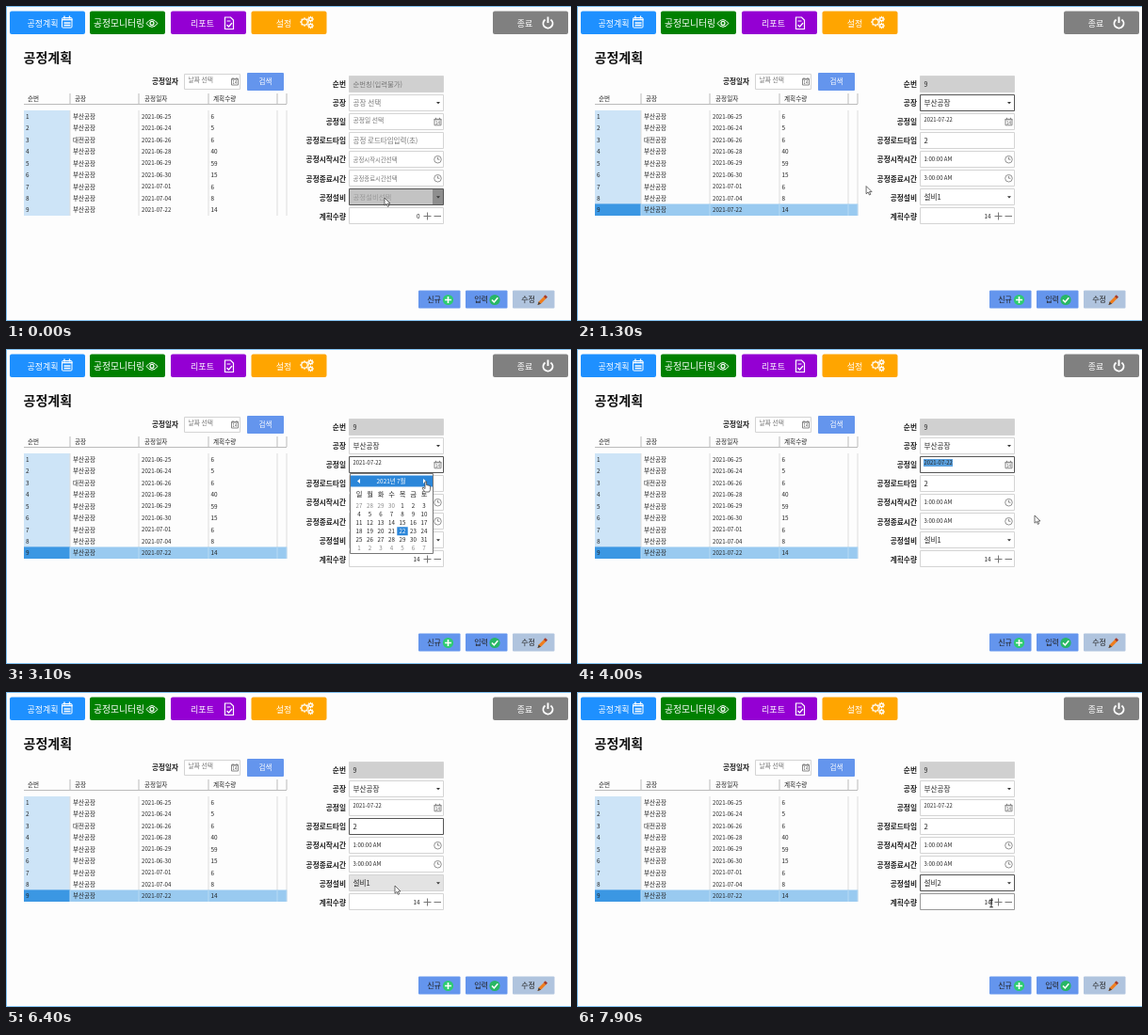
Animation of 600x335 px, one loop 8000 ms. Source, as an HTML page with a canvas:

```html
<!DOCTYPE html>
<html lang="ko">
<head>
<meta charset="utf-8">
<style>
html, body { margin: 0; width: 100%; height: 100%; overflow: hidden; background: #fdfdfd; }
canvas { display: block; }
</style>
</head>
<body>
<canvas id="stage" width="600" height="335"></canvas>
<script>
const c = document.getElementById('stage').getContext('2d');
const LOOP = 8000, FONT = '"Noto Sans CJK KR", "Noto Sans KR", sans-serif';
const INK = '#222', HINT = '#777', BLUE = '#2b86d9';

function rect(x, y, w, h, fill, stroke, r = 0) {
  c.beginPath();
  c.roundRect(x, y, w, h, r);
  if (fill) { c.fillStyle = fill; c.fill(); }
  if (stroke) { c.strokeStyle = stroke; c.lineWidth = 1; c.stroke(); }
}
// y is the middle of the letters
function text(s, x, y, size, color = INK, align = 'left', weight = 400) {
  c.font = `${weight} ${size}px ${FONT}`;
  c.textAlign = align;
  c.fillStyle = color;
  c.fillText(s, x, y + size * 0.36);
}
function path(d, color, width, x = 0, y = 0) {
  c.save();
  c.translate(x, y);
  const p = new Path2D(d);
  if (width) { c.strokeStyle = color; c.lineWidth = width; c.stroke(p); }
  else { c.fillStyle = color; c.fill(p); }
  c.restore();
}
function circle(x, y, r, color, width) {
  c.beginPath();
  c.arc(x, y, r, 0, 7);
  if (width) { c.strokeStyle = color; c.lineWidth = width; c.stroke(); }
  else { c.fillStyle = color; c.fill(); }
}
function gear(x, y, r) {
  circle(x, y, r, '#fff', 1.2);
  for (let i = 0; i < 8; i++) {
    const a = i * Math.PI / 4, u = Math.cos(a), v = Math.sin(a);
    path(`M${u * r} ${v * r}L${u * (r + 1.5)} ${v * (r + 1.5)}`, '#fff', 1.3, x, y);
  }
}
function smallCalendar(x, y) {
  rect(x - 3.5, y - 3, 7, 6.5, '#fff', '#888');
  path('M-4-2.5h8M-2-4.5v2M2-4.5v2', '#888', 1, x, y);
  text('14', x, y + 1, 4.4, '#555', 'center');
}
function clock(x, y) {
  circle(x, y, 3.8, '#777', 0.8);
  path('M0-2.5V0H2', '#777', 0.8, x, y);
}

function topBar() {
  const buttons = [
    [4, '#1e90ff', '공정계획', 39, 9], [89, '#008000', '공정모니터링', 120, 9.8], [175, '#9400d3', '리포트', 208.5, 9],
    [260.5, '#ffa500', '설정', 295, 9], [517, '#808080', '종료', 551, 9]];
  for (const [x, color, label, mid, size] of buttons) {
    rect(x, 5.5, 80, 24.5, color, null, 2);
    text(label, mid, 18.5, size, '#fff', 'center', 500);
  }
  rect(59.5, 12.5, 10.5, 10.5, null, '#fff', 1);
  path('M59 14.5h11.5', '#fff', 1.6);
  path('M62 10.5v3M67.5 10.5v3M61.5 18h7M61.5 20.5h7', '#fff', 1.3);
  path('M149 18.5Q155 10.5 161 18.5Q155 26 149 18.5Z', '#fff', 1);
  circle(155, 18.3, 2, '#fff', 1.2);
  path('M238 24.5H232.5V12H238.5L241.5 15V24.5H238M234.5 16h4M234.5 20l2 2 3.5-4', '#fff', 1.2);
  gear(317, 17, 3.2);
  gear(323.5, 14, 1.7);
  gear(323.5, 21, 1.7);
  c.beginPath();
  c.arc(575.5, 18.5, 5, -0.95, Math.PI + 0.95);
  c.strokeStyle = '#fff'; c.lineWidth = 1.9; c.stroke();
  path('M575.5 11.5v6.5', '#fff', 1.9);
}

function bottomBar() {
  [['신규', 438, '#6495ed'], ['입력', 488, '#6495ed'], ['수정', 538, '#b0c4de']].forEach(([s, x, color]) => {
    rect(x, 302.5, 44.5, 19, color, null, 1);
    text(s, x + 16.5, 312.3, 8, INK, 'center', 500);
  });
  circle(469.5, 312.5, 5.6, '#2ecc71');
  path('M466 312.5h7M469.5 309v7', '#fff', 1.6);
  circle(519, 312.5, 5.6, '#28b765');
  path('M516 312.5l2.3 2.4 4-4.6', '#fff', 1.6);
  path('M564.5 318l1.2-3.6 6.2-6.2 2.3 2.3-6.2 6.2Z', '#ef7d1e');
  path('M564.5 318l1.2-3.6 2.3 2.3Z', '#444');
  path('M571 309l1.8-1.8 2.3 2.3-1.8 1.8Z', '#a33b2c');
}

function table(t) {
  text('공정일자', 155, 80, 7.6, INK, 'left', 700);
  rect(189.5, 72.5, 59, 16, '#fff', '#d4d4d4');
  text('날짜 선택', 193.5, 78.5, 6.8, HINT);
  smallCalendar(243, 80.5);
  rect(256, 71, 39, 19, '#6495ed', null, 1);
  text('검색', 275.5, 80.7, 7.6, '#fff', 'center', 500);

  const cols = [23, 73, 147, 220], edges = [68, 141, 215, 288, 298];
  ['순번', '공장', '공정일자', '계획수량'].forEach((s, i) => text(s, cols[i], 98.7, 6.6, INK, 'left', 500));
  rect(19, 104, 279, 1, '#bbb');
  for (const x of edges) rect(x - 0.5, 93, 1, 11, '#bbb');

  const dates = ['06-25', '06-24', '06-26', '06-28', '06-29', '06-30', '07-01', '07-04', '07-22'];
  const amounts = [6, 5, 6, 40, 59, 15, 6, 8, 14], rowH = 12.45, top = 111;
  rect(19, top, 49, rowH * 9, '#cde4f7');
  for (const x of edges) rect(x - 0.5, top, 1, rowH * 9, '#dedede');
  dates.forEach((date, i) => {
    const y = top + i * rowH, selected = i === 8 && t >= 500, hot = selected && t < 1000;
    if (selected) {
      rect(19, y, 279, rowH, hot ? '#308edf' : '#99caf0');
      rect(19, y, 49, rowH, hot ? '#2384d8' : '#3b97e3');
      for (const x of edges) rect(x - 0.5, y, 1, rowH, hot ? '#509fe4' : '#b7d9f3');
    }
    const mid = y + 6.5, color = hot ? '#fff' : INK;
    text(i + 1, 21, mid, 6.4, INK);
    text(i === 2 ? '대전공장' : '부산공장', 71, mid, 6.5, color);
    text('2021-' + date, 144, mid, 6.1, color);
    text(amounts[i], 217.5, mid, 6.4, color);
  });
}

function form(t) {
  const filled = t >= 500, ink = filled ? INK : HINT;
  const machine = t >= 7100 ? '설비2' : '설비1';
  const fields = [
    ['순번', '순번칭(입력불가)', '9', 7.4, 7],
    ['공장', '공장 선택', '부산공장', 7.6, 7.6],
    ['공정일', '공정일 선택', '2021-07-22', 6.8, 5.9],
    ['공정로드타임', '공정 로드타임입력(초)', '2', 7.5, 7.6],
    ['공정시작시간', '공정시작시간선택', '1:00:00 AM', 6.4, 6],
    ['공정종료시간', '공정종료시간선택', '3:00:00 AM', 6.4, 6],
    ['공정설비', '공정설비선택', machine, 7.4, 7.6],
    ['계획수량', '', '', 7, 7]];
  const focus = t < 500 ? 6 : t < 1900 ? 1 : t < 4800 ? 2 : t < 6500 ? 3 : 6;
  const hover = t < 100 || t >= 6300 && t < 6700;
  fields.forEach(([label, hint, value, hintSize, size], i) => {
    const y = 75 + i * 20.05, mid = y + 8;
    let fill = i ? '#fff' : '#d0d0d0';
    if (i === 6 && hover) fill = t < 100 ? '#c3c3c3' : '#e3e3e3';
    const edge = i === focus ? '#555' : i === 7 && t >= 7400 ? '#999' : '#d4d4d4';
    text(label, 361, mid + 0.5, 7.7, INK, 'right', 700);
    rect(364.5, Math.round(y) - 0.5, 100, 17, fill, edge);
    if (i === 2 && t >= 3600 && t < 4800) rect(368, 117, 31, 8, '#5aa0de');
    const valueColor = i === 6 && t < 100 ? '#999' : ink;
    text(filled ? value : hint, 368.5, mid - (i === 2 ? 1.8 : 0), filled ? size : hintSize, valueColor);
    if (i === 1 || i === 6) {
      if (i === 6 && t < 100) rect(453, 195, 11, 16, '#8e8e8e');
      path('M-2-1.1h4L0 1.2Z', '#333', 0, 459, mid);
    }
    if (i === 2) smallCalendar(458.5, mid + 0.2);
    if (i === 4 || i === 5) clock(458.5, mid);
  });
  text(filled ? '14' : '0', 439.5, 223.3, 6.3, INK, 'right');
  path('M443.5 223.5h8M447.5 219.5v8M454.5 223.5h7.5', '#777', 1);
  if (t >= 1900 && t < 2300) rect(399, 117, 0.8, 8, '#111');
  if (t >= 7900) rect(440, 219, 0.7, 7, '#111');
}

function calendar() {
  rect(365.5, 132.5, 88, 85, '#fff', '#777');
  rect(366, 134.5, 87, 12, BLUE);
  text('2021년 7월', 409, 140.6, 6.4, '#fff', 'center', 500);
  path('M376 138v5l-3-2.5ZM443 138v5l3-2.5Z', '#fff');
  [...'일월화수목금토'].forEach((s, i) => text(s, 375 + i * 11.5, 154.7, 7.3, INK, 'center', 500));
  for (let i = 0; i < 42; i++) {
    const day = new Date(2021, 5, 27 + i), x = 375 + i % 7 * 11.5, y = 167 + Math.floor(i / 7) * 8.95;
    const today = i === 25, inMonth = day.getMonth() === 6;
    if (today) rect(x - 5.7, y - 4.6, 11.4, 9, BLUE);
    text(day.getDate(), x, y, 6.2, today ? '#fff' : inMonth ? INK : '#888', 'center');
  }
}

function machineList(t) {
  rect(364.5, 211.5, 100, 29, '#fff', '#888');
  rect(365, t < 6800 ? 212 : 226, 99, 14, '#cde4f7');
  text('설비1', 368.5, 219, 7.6);
  text('설비2', 368.5, 233, 7.6);
}

// time, x, y of the pointer
const moves = [
  [0, 402, 204], [450, 253, 221], [1000, 253, 221], [1800, 424, 128], [2300, 424, 128],
  [2700, 458, 123], [2800, 458, 123], [3100, 446, 141], [3500, 446, 141], [4000, 486, 177],
  [4100, 486, 177], [4500, 450, 104], [4900, 420, 143], [5000, 420, 143], [5700, 416, 183],
  [6000, 416, 183], [6400, 413, 206], [6500, 413, 206], [6800, 412, 232], [7000, 412, 232],
  [7500, 447, 223], [7700, 447, 223], [7900, 440, 225], [LOOP, 440, 225]];
const ARROW = 'M0 0V8.2L2 6.4 3.4 9.4 4.7 8.8 3.4 6H6Z';
const HAND = 'M-1 0H.6V3.6L4.6 4.6V8.5L3.5 11H-1.2L-4 7 -3.2 6 -1 7.6Z';
const BEAM = 'M-1.8-3.8H1.8M0-3.8V3.8M-1.8 3.8H1.8';

function pointer(t) {
  const i = moves.findIndex(m => m[0] > t), [t0, x0, y0] = moves[i - 1], [t1, x1, y1] = moves[i];
  const p = (t - t0) / (t1 - t0), e = p * p * (3 - 2 * p);
  const x = x0 + (x1 - x0) * e, y = y0 + (y1 - y0) * e;
  const within = (a, b) => t >= a && t < b;
  if (within(1700, 2600) || within(4800, 5200) || t >= 7800) return path(BEAM, '#111', 0.9, x, y);
  const shape = within(2900, 3600) ? HAND : ARROW;
  path(shape, '#fff', 0, x, y);
  path(shape, '#333', 0.7, x, y);
}

function draw(now) {
  const t = Math.floor(now % LOOP / 100) * 100;
  rect(0, 0, 600, 335, '#fdfdfd');
  rect(0, 0, 600, 1, '#7fbfee');
  rect(0, 0, 1, 335, '#7fbfee');
  rect(0, 334, 600, 1, '#7fbfee');
  topBar();
  text('공정계획', 18.5, 55, 14, '#111', 'left', 700);
  table(t);
  form(t);
  if (t >= 2800 && t < 3600) calendar();
  if (t >= 6600 && t < 7100) machineList(t);
  bottomBar();
  pointer(t);
  requestAnimationFrame(draw);
}
requestAnimationFrame(draw);
</script>
</body>
</html>
```
